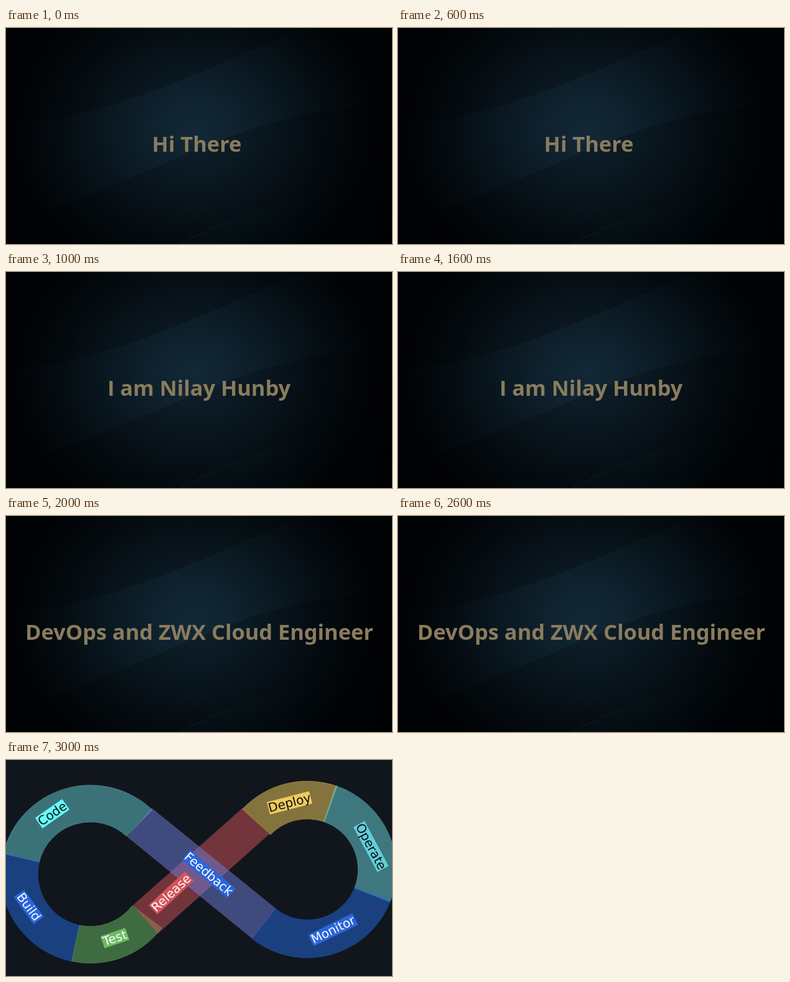
These frames come from a looping animation (620 by 349 pixels, 4000 ms). An HTML page:

```html
<!DOCTYPE html>
<html lang="en">
<head>
<meta charset="utf-8">
<title>Intro</title>
<style>
html, body { margin: 0; width: 100%; height: 100%; overflow: hidden; background: #010305; }
svg { display: block; width: 100%; height: 100%; }
text { text-anchor: middle; }
.line { font: bold 34.4px "Noto Sans", sans-serif; fill: #8a7c5d; }
.plain { font-family: "Open Sans", sans-serif; }
#tags { font: 20px "DejaVu Sans", sans-serif; }
.edge { fill: none; stroke: #36505c; stroke-width: .8; stroke-opacity: .28; }
</style>
</head>
<body>
<svg viewBox="0 0 620 349">
  <defs>
    <radialGradient id="glow" gradientUnits="userSpaceOnUse" cx="0" cy="0" r="1"
        gradientTransform="translate(303 164) scale(292 255)">
      <stop offset="0" stop-color="#132938"/>
      <stop offset=".35" stop-color="#0c1d28"/>
      <stop offset=".7" stop-color="#050e14"/>
      <stop offset="1" stop-color="#010305"/>
    </radialGradient>
    <linearGradient id="fade">
      <stop offset="0" stop-color="#fff" stop-opacity=".25"/>
      <stop offset=".5" stop-color="#fff"/>
      <stop offset="1" stop-color="#fff" stop-opacity="0"/>
    </linearGradient>
    <mask id="soft" maskUnits="userSpaceOnUse" x="0" y="0" width="620" height="349">
      <rect width="620" height="349" fill="url(#fade)"/>
    </mask>
  </defs>
  <g id="intro">
    <rect width="620" height="349" fill="url(#glow)"/>
    <path d="M0 160C150 152 310 72 485 0H0Z" fill="#000" opacity=".2"/>
    <path d="M60 291C220 247 385 137 560 127L620 130V349H0V310Z" fill="#000" opacity=".2"/>
    <g mask="url(#soft)">
      <path d="M279 349C350 312 430 276 520 275L620 282V349Z" fill="#12303f" opacity=".1"/>
      <g class="edge">
        <path d="M0 160C150 152 310 72 485 0"/>
        <path d="M60 291C220 247 385 137 560 127"/>
        <path d="M279 349C350 312 430 276 520 275"/>
      </g>
    </g>
    <text class="line" x="306.5" y="200">Hi There</text>
    <text class="line plain" x="310" y="200">I am Nilay Hunby</text>
    <text class="line" x="310.5" y="200">DevOps and ZWX Cloud Engineer</text>
  </g>
  <g id="cycle">
    <rect width="620" height="349" fill="#11161c"/>
    <g id="bands"></g>
    <g id="tags"></g>
  </g>
</svg>
<script>
const $ = id => document.getElementById(id);
const lines = document.querySelectorAll(".line");

function add(parent, tag, attrs, text = "") {
  const el = document.createElementNS("http://www.w3.org/2000/svg", tag);
  for (const k in attrs) el.setAttribute(k, attrs[k]);
  el.textContent = text;
  $(parent).append(el);
}

function band(d, color) {
  add("bands", "path", { d, fill: color, stroke: color, "fill-opacity": .5, "stroke-opacity": .4, "stroke-width": .8 });
}

// Ring sector, clockwise from angle a to b in degrees
function sector([cx, cy, outer, inner], a, b, color) {
  const at = (r, deg) => {
    const t = deg * Math.PI / 180;
    return `${cx + r * Math.cos(t)} ${cy + r * Math.sin(t)}`;
  };
  const big = +(b - a > 180);
  band(`M${at(outer, a)}A${outer} ${outer} 0 ${big} 1 ${at(outer, b)}` +
       `L${at(inner, b)}A${inner} ${inner} 0 ${big} 0 ${at(inner, a)}Z`, color);
}

function label(text, x, y, angle, width, fill, ink) {
  const transform = `translate(${x} ${y}) rotate(${angle})`;
  add("tags", "rect", { x: -width / 2, y: -10.5, width, height: 20.5, fill, transform });
  add("tags", "text", { y: 6.5, fill: ink, transform }, text);
}

const left = [135.5, 184.5, 144, 84.3], right = [484, 176.8, 142.8, 81.5];
sector(left, 193.4, 313.7, "#67ced4");
sector(left, 102, 193.4, "#256ae4");
sector(left, 37, 102, "#6fc064");
band("M204 235L380 78L422 120L244 280Z", "#d3545a");
sector(right, 223.2, 289.6, "#f9d060");
sector(right, -71.2, 21.6, "#6ddae0");
sector(right, 20.6, 128.7, "#256ae4");
band("M234 78L433 240L395 288L195 124Z", "#717edc");

const dark = "#0b0f12", light = "#fff";
label("Code", 74.5, 87, -35, 53, "#62ffff", dark);
label("Build", 36.5, 237.5, 54, 54, "#2a66dc", light);
label("Test", 175, 288, -19, 42, "#6dbb66", light);
label("Release", 265.5, 215, -43, 80, "#d3545a", light);
label("Feedback", 325.5, 184.5, 40.5, 96, "#2a66dc", light);
label("Deploy", 455.5, 69.5, -14.5, 70, "#eecb5d", dark);
label("Operate", 586, 140, 62, 82, "#62cdd8", dark);
label("Monitor", 525.5, 274.5, -26, 79, "#2a66dc", light);

const show = (el, on) => el.style.display = on ? "" : "none";

function draw(now) {
  const step = Math.floor(now % 4000 / 1000);
  lines.forEach((line, i) => show(line, i === step));
  show($("intro"), step < lines.length);
  show($("cycle"), step === lines.length);
}

const start = performance.now();
function tick() {
  draw(performance.now() - start);
  requestAnimationFrame(tick);
}
tick();
</script>
</body>
</html>
```
